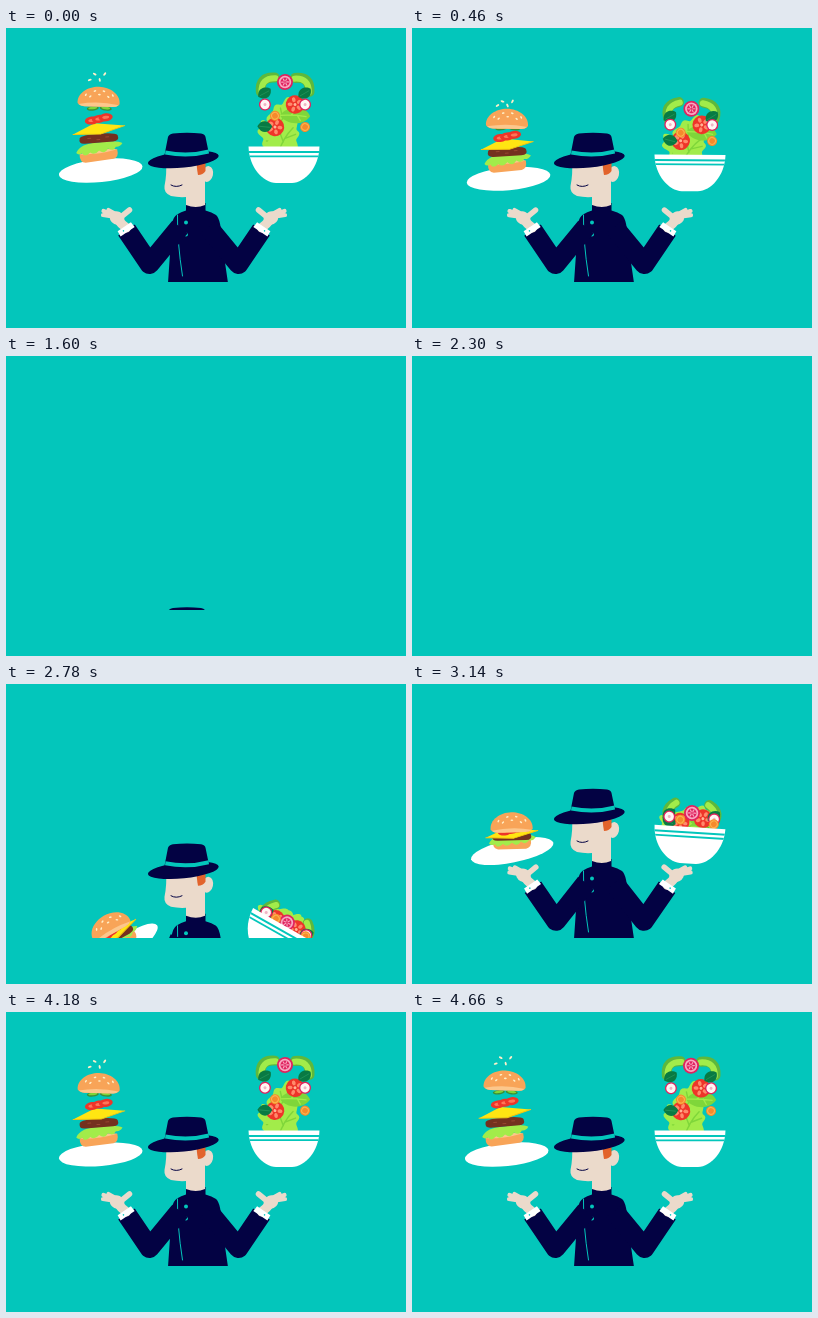
Animation of 400x300 px, one loop 4680 ms. Source, as an HTML page with a canvas:

```html
<!DOCTYPE html>
<html lang="en">
<head>
<meta charset="utf-8">
<title>Juggling chef</title>
<style>
html, body { margin: 0; width: 100%; height: 100%; overflow: hidden; background: #03c6bb; }
canvas { display: block; width: 400px; height: 300px; }
</style>
</head>
<body>
<canvas id="stage" width="400" height="300"></canvas>
<script>
const ctx = document.getElementById('stage').getContext('2d');
const LOOP = 4680, STEP = 20, TOP = 4440, FLOOR = 254;
const C = {
  bg: '#03c6bb', navy: '#030243', skin: '#ebdacb', white: '#fff', hair: '#e2632b',
  bun: '#f8a458', crumb: '#fcc78c', seed: '#fff0c9', cheese: '#ffe512', patty: '#74301f',
  green: '#7fd63a', lime: '#a2ec4a', dark: '#087a43', red: '#ee3529', pink: '#e0225f', orange: '#f58a2c'
};

const mix = (a, b, k) => a + (b - a) * k;
function ramp(t, from, to) {
  const u = Math.min(1, Math.max(0, (t - from) / (to - from)));
  return u * u * (3 - 2 * u);
}

// 1 while held, 0 at the top of the throw
function flight(t, release, land, up, down) {
  const falling = (t - TOP + LOOP) % LOOP, fall = land - TOP + LOOP;
  if (falling < fall) return (falling / fall) ** down;
  return t < release ? 1 : ((TOP - t) / (TOP - release)) ** up;
}

function poseAt(t) {
  const hide = ramp(t, 800, 1420) - ramp(t, 2390, 3050);
  const drop = ramp(t, 1990, 2130);
  const peek = ramp(t, 1550, 1860) - drop;
  const grip = flight(t, 2940, 900, 6, 4);
  const sway = ramp(t, 3500, TOP) + 1 - ramp(t, 0, 540);
  const sag = 1 + 1.3 * hide;
  return {
    x: 15 * (drop - ramp(t, 2140, 2160)),
    y: 150 * hide - 50 * peek,
    arm: grip ** 3 + hide,
    fall: 58 * grip + 178 * hide,
    plate: { x: 94.7 + 13 * grip + 25 * hide, tilt: (-2 - 22 * grip) * sag - 4 * (sway % 1 || sway > 0) * (1 - grip) },
    bowlTilt: 20 * grip * grip * sag,
    burgerTilt: -20 * grip ** 3 * sag,
    burgerOpen: 1 - flight(t, 3140, 860, 1.6, 2.5),
    saladOpen: 1 - flight(t, 3060, 860, 3, 2.5)
  };
}

function at(x, y, deg, draw) {
  ctx.save();
  ctx.translate(x, y);
  ctx.rotate(deg * Math.PI / 180);
  draw();
  ctx.restore();
}
function shape(d, color) {
  ctx.fillStyle = color;
  ctx.fill(new Path2D(d));
}
function line(d, color, width, cap = 'round') {
  ctx.strokeStyle = color;
  ctx.lineWidth = width;
  ctx.lineCap = cap;
  ctx.lineJoin = 'round';
  ctx.stroke(new Path2D(d));
}
function oval(x, y, rx, ry, color, deg = 0) {
  ctx.fillStyle = color;
  ctx.beginPath();
  ctx.ellipse(x, y, rx, ry, deg * Math.PI / 180, 0, 7);
  ctx.fill();
}
function rings(r, ...colors) {
  colors.forEach((c, i) => oval(0, 0, r * (1 - i * 0.22), r * (1 - i * 0.22), c));
}
function spokes(n, dist, rx, ry, color) {
  for (let i = 0; i < n; i++) at(0, 0, i * 360 / n, () => oval(dist, 0, rx, ry, color));
}

const FOOD = {
  l: { size: 18, name: 'lettuce', draw() {
    ctx.fillStyle = C.lime;
    ctx.beginPath();
    for (let a = 0; a < 6.3; a += 0.1) {
      const r = 16 + 1.8 * Math.sin(a * 8) + 2 * Math.sin(a * 3);
      ctx.lineTo(r * 0.85 * Math.cos(a), r * 1.15 * Math.sin(a));
    }
    ctx.fill();
    line('M0 16Q-2 0 3 -13M0 4L-8 -4M0 0L8 -8', C.green, 1.4);
  } },
  f: { size: 15, name: 'leaf', draw() {
    shape('M-15 2C-8 -10 8 -12 15 -2C9 10 -8 10 -15 2Z', C.green);
    line('M-15 2Q0 -1 11 -1M-4 0L0 -5M2 -1L6 4', C.lime, 1.3);
  } },
  a: { size: 13, name: 'avocado', draw() {
    line('M-10 4Q0 -8 10 4', '#5eb83c', 10);
    line('M-10 5Q0 -6 10 5', C.lime, 6);
  } },
  t: { size: 9, name: 'tomato', draw() {
    rings(9.3, C.red);
    spokes(5, 5, 2.5, 1.8, '#ff8a6b');
    oval(0, 0, 1.5, 1.5, '#ffb597');
  } },
  b: { size: 8, name: 'beet', draw() {
    rings(8, C.pink, '#f7a9c1', C.pink);
    spokes(6, 2.5, 1.8, 0.6, '#f7a9c1');
  } },
  d: { size: 7, name: 'dark leaf', draw() {
    shape('M-7 3C-7 -7 2 -7 6 -4C7 4 0 8 -7 3Z', C.dark);
    line('M-5 2L4 -2', '#22955a', 0.8);
  } },
  r: { size: 6, name: 'radish', draw() {
    rings(6, C.pink, '#fff6f4');
    oval(0, 0, 1.5, 1.5, '#f0b4c4');
  } },
  c: { size: 5, name: 'carrot', draw() { rings(5, C.orange, '#fab34f', C.orange); } }
};

// Airborne salad seen as a loose grid, large pieces at the back
const SALAD = ['a.b.a', 'd...d', 'r..tr', '.clf.', 'dt..c', '.ll..']
  .flatMap((row, j) => [...row].map((key, i) => ({ food: FOOD[key], x: i * 10 - 19, y: j * 11.5 - 66, turn: (i * 67 + j * 41) % 90 - 45 })))
  .filter(p => p.food)
  .sort((p, q) => q.food.size - p.food.size);

// Burger from the bottom up
const LAYERS = [
  () => {
    shape('M-19 -3Q0 -7 19 -3Q20 5 14 6H-14Q-20 5 -19 -3Z', C.bun);
    shape('M-19 -3Q0 -7 19 -3Q0 0 -19 -3Z', C.crumb);
  },
  () => shape('M-23 3Q-18 -6 0 -5Q18 -6 24 -2Q21 2 17 1Q14 6 9 2Q5 8 0 3Q-5 8 -9 4Q-15 9 -17 4Q-21 6 -23 3Z', C.lime),
  () => {
    shape('M-19 -2Q-17 -5 0 -5Q17 -5 19 -2Q21 4 14 4H-14Q-21 4 -19 -2Z', C.patty);
    line('M-11 -1H-8M-2 1H1M7 -1H10', '#984731', 1);
  },
  () => {
    shape('M-26 4L-4 -6L26 -2L2 5Z', C.cheese);
    line('M-26 4L2 5L26 -2', '#f6c50e', 1);
  },
  () => {
    for (const x of [-7, 0, 7]) {
      oval(x, -x * 0.2, 7, 4, C.red, -6);
      oval(x, -x * 0.2, 3.5, 1.5, '#ff7558', -6);
    }
  },
  () => {
    for (const x of [-6, 7]) {
      oval(x, 0, 6, 2.2, '#3c8f36', x);
      oval(x, -0.4, 4.5, 1.2, C.green, x);
    }
  },
  () => {
    shape('M-21 6C-22 -4 -11 -11 0 -11S22 -4 21 6Q19 9 14 9H-14Q-19 9 -21 6Z', C.bun);
    shape('M-20 7Q0 3 20 7Q18 9 14 9H-14Q-18 9 -20 7Z', C.crumb);
    for (let i = 0; i < 7; i++) oval(i * 4.5 - 13, (i - 3) ** 2 * 0.5 - 7 + i % 2 * 4, 1.4, 0.8, C.seed, i * 20 - 60);
  }
];

function drawBurger(p) {
  const { x, tilt } = p.plate, open = p.burgerOpen, y = 142.5 + p.fall;
  at(x, y, tilt, () => oval(0, 0, 42, 11.5, C.white));
  at(x, y, p.burgerTilt, () => {
    LAYERS.forEach((draw, i) => {
      const air = -16 - 58 * (i / 6) ** 1.15;
      at(-2 * open, mix(-8 - 3.3 * i, air, open), (i - 5) * 1.6 * open, draw);
    });
    if (open > 0.05) for (let i = 0; i < 4; i++)
      at(i * 5 - 11, mix(-34, -92 - i % 2 * 6, open), i * 50 - 60 + open * 40, () => oval(0, 0, 2, 1, C.seed));
  });
}

function drawBowl(p) {
  const open = p.saladOpen;
  at(278, 118.5 + p.fall, p.bowlTilt, () => {
    for (const { food, x, y, turn } of SALAD)
      at(x * mix(1.15, 1, open), mix(y * 0.06, y, open), turn * (2 - open), food.draw);
    const body = 'M-35.500 0C-35 21 -21 36 -8 36.500H8C21 36 35 21 35.500 0Z';
    shape(body, C.white);
    ctx.clip(new Path2D(body));
    line('M-36 5.500H36', C.bg, 2, 'butt');
    line('M-36 9.700H36', C.bg, 1.8, 'butt');
  });
}

function drawArm(a) {
  const cx = mix(120.5, 126, a), cy = mix(202, 219, a);
  const ex = mix(143.5, 151, a), ey = mix(236, 247, a);
  const turn = Math.atan2(cy - ey, cx - ex) * 180 / Math.PI + 90;
  line(`M174 199L${ex} ${ey}L${cx} ${cy}`, C.navy, 20, 'butt');
  at(cx, cy, turn, () => {
    line('M1 -2Q-1 -8 -1 -13', C.skin, 9.5);
    shape('M-8.500 2L-8 -4H8L8.500 2Z', C.white);
    oval(-3, -1, 0.8, 0.8, C.bg);
  });
  at(cx - 10, cy - 12, -8 * a, () => {
    line('M-1 -1L-13.500 -3M0 -2L-13 -7M1 -3L-8 -8', C.skin, 4.2);
    line('M1 2Q8 -4 13 -8', C.skin, 5.5);
    oval(0.500, 0, 7.5, 6.5, C.skin, 25);
  });
}

function drawBody() {
  shape('M162 255L164 226Q163 191 171 186.500Q175 184 180 182.500V175H199.500V182.500Q206 184 210 187Q215 191 216 214L222 255Z', C.navy);
  line('M171.500 187Q171 213 176.500 248', C.bg, 1);
  for (const y of [194.5, 206.5]) oval(180, y, 2, 2, C.bg);
}

function drawHead() {
  oval(201.5, 146, 5.5, 8, C.skin, 12);
  shape('M160 132H199V177Q190 181 180 177V169Q172 169.500 165 168Q157.500 165 158.500 158Q161 146 160 132Z', C.skin);
  shape('M190.500 130H199.500V143Q197 147 192 147Q190.500 140 190.500 130Z', C.hair);
  line('M165 157Q170 160 176 157', C.navy, 1);
  oval(177.3, 131.5, 35.6, 8, C.navy, -6);
  shape('M158.500 127L162 109Q163 106 167 105.500Q181 104 195 105.500Q199 106 199.500 109L203 126Q181 133 158.500 127Z', C.navy);
  shape('M159.500 122.500Q182 127 202.500 121.500L203 125.500Q182 131 159 126.500Z', C.bg);
}

function render(t) {
  const p = poseAt(t);
  ctx.fillStyle = C.bg;
  ctx.fillRect(0, 0, 400, 300);
  ctx.save();
  ctx.beginPath();
  ctx.rect(0, 0, 400, FLOOR);
  ctx.clip();
  at(p.x, p.y, 0, () => { drawBody(); drawHead(); });
  drawBurger(p);
  drawBowl(p);
  at(p.x, p.y, 0, () => {
    drawArm(p.arm);
    ctx.translate(376, 0);
    ctx.scale(-1, 1);
    drawArm(p.arm);
  });
  ctx.restore();
}

const start = performance.now();
function tick() {
  const t = (performance.now() - start) % LOOP;
  render(Math.floor(t / STEP) * STEP);
  requestAnimationFrame(tick);
}
tick();
</script>
</body>
</html>
```
